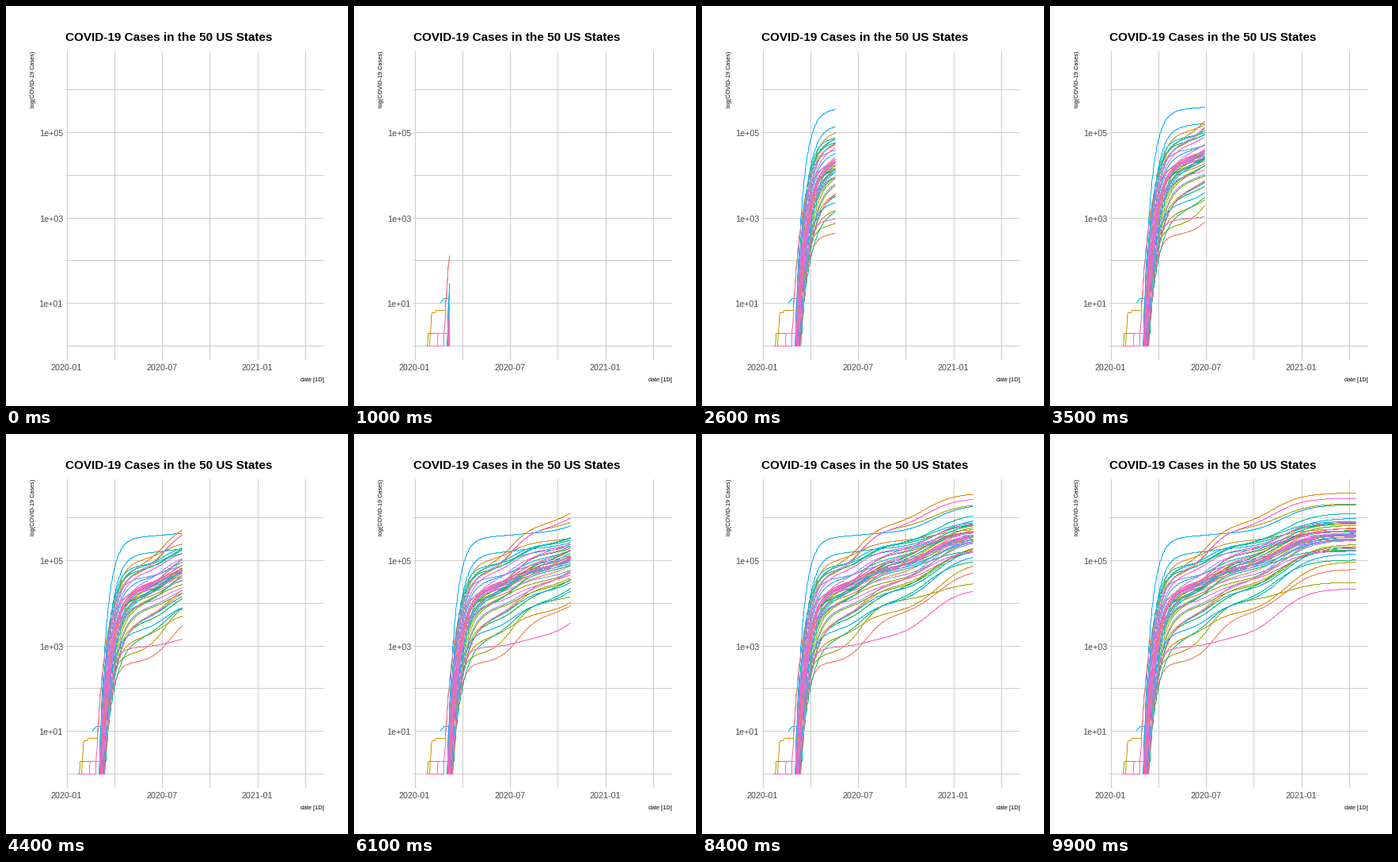
Recreate the animation shown at these times as a matplotlib script. Size 432 by 504 pixels, loop 10000 ms.

```python
import numpy as np
import matplotlib.pyplot as plt
from matplotlib.animation import FuncAnimation

W, H = 432, 504
FRAMES, INTERVAL = 100, 100
FIRST, LAST = 20, 470          # days since 2020-01-01

STATES = ("AL AK AZ AR CA CO CT DE FL GA HI ID IL IN IA KS KY LA ME MD MA MI "
          "MN MS MO MT NE NV NH NJ NM NY NC ND OH OK OR PA RI SC SD TN TX UT "
          "VT VA WA WV WI WY").split()

# Outstanding curves: spring start day, spring level, rise time, then
# summer and winter growth; levels and growth in powers of ten
KEY = {"NY": (61, 5.56, 14.5, .07, .68),
       "NJ": (64, 5.18, 16, .10, .71),
       "CA": (53, 4.90, 22, .90, .78),
       "TX": (62, 4.75, 18, .95, .76),
       "FL": (62, 4.68, 16, 1.05, .60),
       "WA": (54, 4.27, 17, .55, .77),
       "VT": (68, 2.97, 12, .20, 1.17),
       "HI": (68, 2.80, 12, 1.25, .44),
       "AK": (72, 2.60, 11, 1.10, 1.10)}

# First scattered cases: (day, count)
EARLY = {"WA": [(20, 1)],
         "IL": [(23, 1), (25, 2)],
         "CA": [(28, 1), (32, 6), (38, 6), (39, 7)],
         "TX": [(42, 1), (44, 2)],
         "NE": [(48, 10), (55, 13)]}

rng = np.random.default_rng(7)


def hue_color(i, n, chroma=100, lum=65):
    """Evenly spaced hue in polar LUV, as sRGB."""
    h = np.radians(15 + 360 * i / n)
    y = ((lum + 16) / 116) ** 3
    u = chroma * np.cos(h) / (13 * lum) + .1978
    v = chroma * np.sin(h) / (13 * lum) + .4683
    x = 9 * y * u / (4 * v)
    z = -x / 3 - 5 * y + 3 * y / v
    lin = np.clip(np.array([[3.2405, -1.5371, -.4985],
                            [-.9693, 1.8760, .0416],
                            [.0556, -.2040, 1.0572]]) @ [x, y, z], 0, 1)
    return np.where(lin > .0031308, 1.055 * lin ** (1 / 2.4) - .055, 12.92 * lin)


def sigmoid(t, mid, width):
    return 1 / (1 + np.exp((mid - t) / width))


def random_waves():
    level = rng.triangular(3.0, 4.25, 5.1)
    start = 78 - 3 * level + rng.uniform(-3, 5)
    growth = 5.6 + .5 * (level - 4.2) + rng.normal(0, .14) - level
    share = rng.uniform(.25, .6)
    return start, level, rng.uniform(14, 22), growth * share, growth * (1 - share)


def curve(code):
    """Days and log10 cases: a spring rise, then a summer and a winter wave."""
    start, level, rise, summer, winter = KEY.get(code) or random_waves()
    early = EARLY.get(code, [(round(start), 1)])
    t = np.arange(early[0][0], LAST + 1.0)
    logs = (level * (1 - np.exp(-np.maximum(t - start, 0) / rise))
            + summer * sigmoid(t, rng.uniform(185, 200), 19)
            + winter * sigmoid(t, rng.uniform(308, 340), 29))
    wave = np.where(t > start, 10 ** logs, 1)
    return t, np.log10(np.maximum(np.rint(wave), np.interp(t, *zip(*early))))


def to_pixels(day, log_cases):
    """Screen position, held to pixel centres."""
    return (np.floor(77.5 + .6585 * day) + .5,
            np.floor(428.5 - 53.82 * log_cases) + .5)


plt.rcParams["font.family"] = "Liberation Sans"
fig = plt.figure(figsize=(W / 72, H / 72), dpi=72, facecolor="white")
ax = fig.add_axes([0, 0, 1, 1])
ax.set(xlim=(0, W), ylim=(H, 0))
ax.axis("off")

stroke = dict(lw=1, snap=False, solid_capstyle="butt", solid_joinstyle="bevel")
for x in (77.5, 137.5, 197.5, 257.5, 318.5, 378.5):
    ax.plot([x, x], [57, 446], color="#cccccc", **stroke)
for y in (105.5, 159.5, 213.5, 267.5, 320.5, 374.5, 428.5):
    ax.plot([75, 402], [y, y], color="#cccccc", **stroke)

ax.text(75, 44, "COVID-19 Cases in the 50 US States", size=15.3, weight="bold")
tick = dict(size=10.7, color="#4d4d4d")
for x, s in ((76.5, "2020-01"), (196.5, "2020-07"), (317.5, "2021-01")):
    ax.text(x, 459, s, ha="center", **tick)
for y, s in ((164, "1e+05"), (272, "1e+03"), (379, "1e+01")):
    ax.text(72, y, s, ha="right", **tick)
ax.text(402, 473, "date [1D]", ha="right", size=7.4)
ax.text(35, 57, "log(COVID-19 Cases)", rotation=90, ha="center", va="top", size=7.4)

curves = [curve(code) for code in STATES]
lines = [ax.plot([], [], color=hue_color(i, len(STATES)), **stroke)[0]
         for i in range(len(STATES))]


def update(i):
    now = max(FIRST + (LAST - FIRST) * i / (FRAMES - 1), FIRST + 1)
    for line, (t, logs) in zip(lines, curves):
        n = np.searchsorted(t, now)
        if n == 0:
            line.set_data([], [])
        else:
            line.set_data(*to_pixels(np.append(t[:n], now),
                                     np.append(logs[:n], np.interp(now, t, logs))))
    return lines


anim = FuncAnimation(fig, update, frames=FRAMES, interval=INTERVAL,
                     init_func=lambda: update(0), repeat=True, repeat_delay=0)
plt.show()
```
